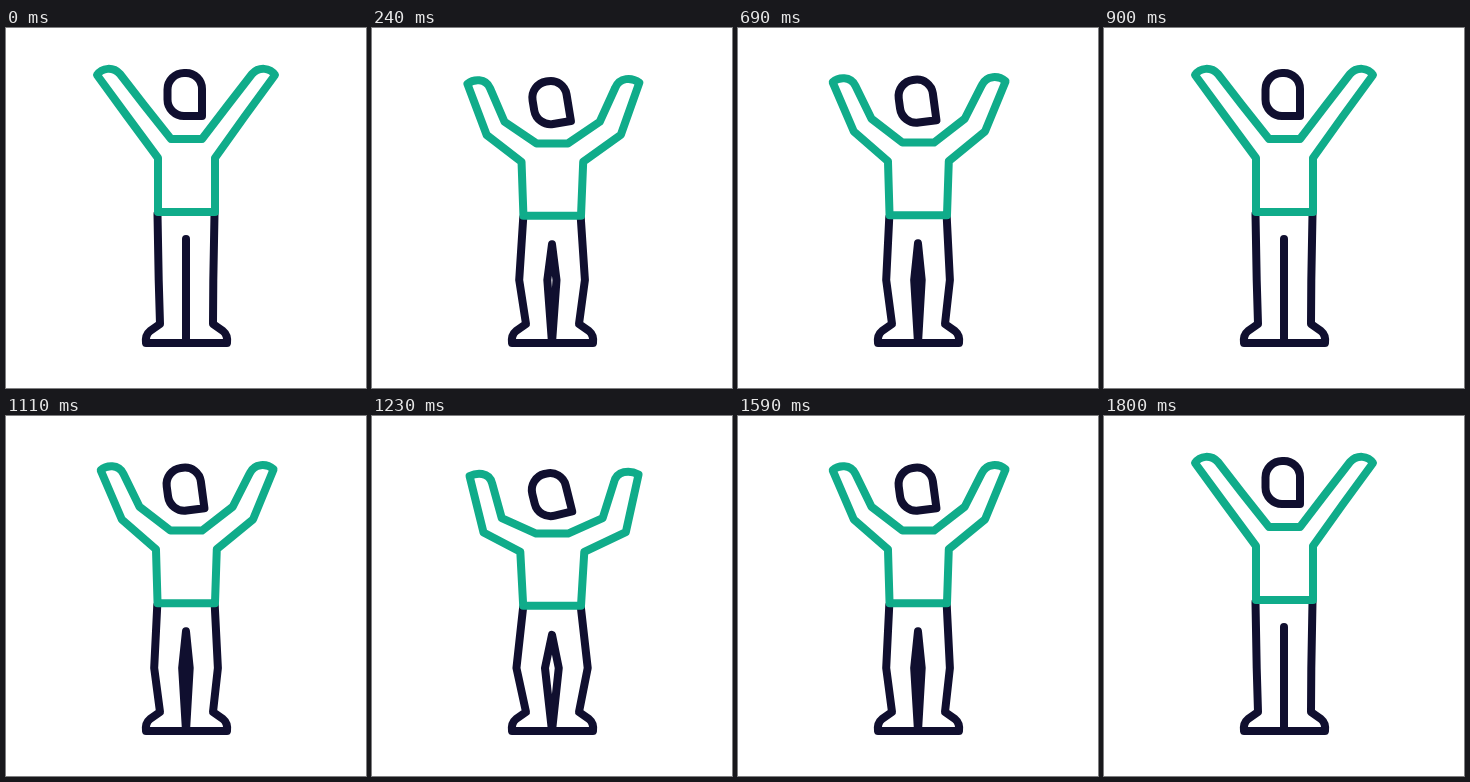
An HTML page that plays this animation: 360 by 360 pixels, repeating every 1830 ms.

```html
<!DOCTYPE html>
<html lang="en">
<head>
<meta charset="utf-8">
<title>Stretch</title>
<style>
  html, body { margin: 0; width: 100%; height: 100%; overflow: hidden; background: #fff; }
  svg { display: block; width: 100vw; height: 100vh; }
  path { fill: none; stroke-width: 8; stroke-linecap: round; stroke-linejoin: round; }
  .dark { stroke: #100f2f; }
  .teal { stroke: #10ac8a; }
</style>
</head>
<body>
<svg viewBox="0 0 360 360">
  <path id="head" class="dark" d="M-17.5 -5A16.5 16.5 0 0 1 -1 -21.5H1A16 16 0 0 1 17 -5.5V21.5H-1A16.5 16.5 0 0 1 -17.5 5Z"/>
  <path id="legs" class="dark"/>
  <path id="body" class="teal"/>
</svg>
<script>
const LOOP = 1830, STEP = 30, HALF = 450;
const [head, legs, body] = ["head", "legs", "body"].map(id => document.getElementById(id));

// Each pair of numbers is the value with arms raised and with knees bent.
const mix = (p, a, b) => +(a + (b - a) * p).toFixed(2);

function draw(p) {
  const pt = (x0, y0, x1, y1) => mix(p, x0, x1) + " " + mix(p, y0, y1);

  head.setAttribute("transform",
    `translate(${pt(179, 66.5, 178.4, 81.2)}) rotate(${mix(p, 0, -17)})`);

  body.setAttribute("d", [
    "M", pt(152, 184, 151, 191),
    "L", pt(152, 130, 147.5, 137),
    "L", pt(121, 88, 109.5, 122.5),
    "L", pt(91, 47, 99, 63),
    "C", pt(96, 39.5, 106, 60.5), pt(107, 38.5, 119, 59), pt(114, 46, 121.5, 72),
    "L", pt(138, 77, 128, 107.5),
    "L", pt(165, 111, 164, 119),
    "L", pt(196, 111, 196, 119),
    "L", pt(222, 77, 232.5, 107.5),
    "L", pt(246, 46, 241, 71),
    "C", pt(253, 38.5, 243, 58), pt(264, 39.5, 256, 56.5), pt(269, 47, 266, 61),
    "L", pt(239, 88, 257, 122),
    "L", pt(209, 130, 213, 137),
    "L", pt(209, 184, 209, 191), "Z"
  ].join(" "));

  legs.setAttribute("d", [
    "M", pt(151.5, 186, 151, 193),
    "L", pt(152.7, 252, 142.7, 252),
    "L 154 296 L 144 303 Q 139 307 140 315 H 221 Q 222 307 217 303 L 207 296",
    "L", pt(207.3, 252, 217.5, 252),
    "L", pt(208.5, 186, 209, 193),
    "M 180 315 L", pt(180, 252, 171.5, 252),
    "L", pt(180, 211, 180, 220.5),
    "L", pt(180, 252, 188.2, 252), "Z"
  ].join(" "));
}

const start = performance.now();
function tick() {
  const t = Math.floor((performance.now() - start) % LOOP / STEP) * STEP;
  const u = 1 - Math.abs(1 - t % (2 * HALF) / HALF);
  draw(u * u * (3 - 2 * u));
  requestAnimationFrame(tick);
}
tick();
</script>
</body>
</html>
```
